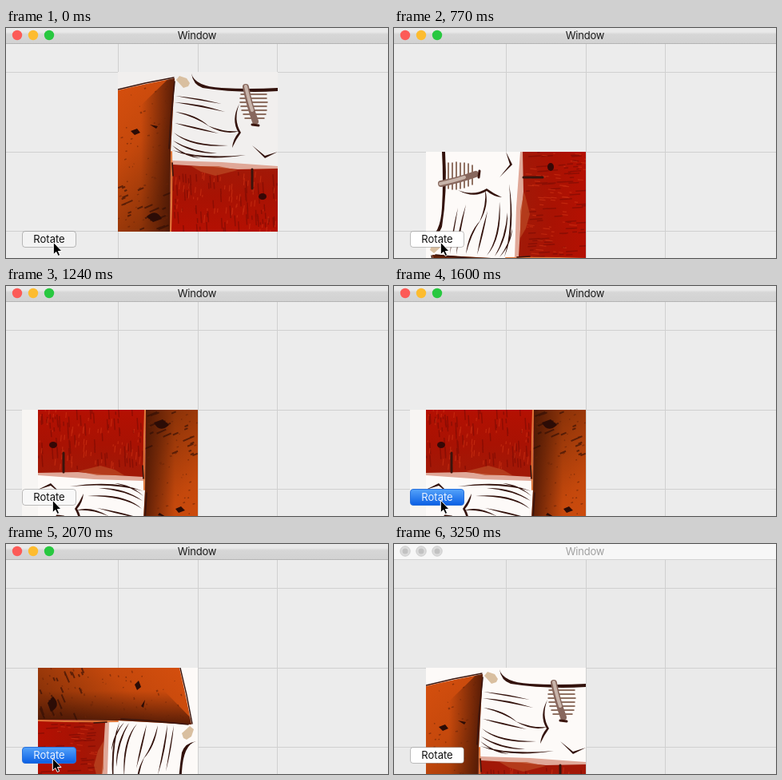
An HTML page that plays this animation: 478 px wide and 288 px high, repeating every 3.35 s.

```html
<!DOCTYPE html>
<html lang="en">
<head>
<meta charset="utf-8">
<title>Window</title>
<style>
html, body { margin: 0; width: 100%; height: 100%; overflow: hidden; background: #ececec }
svg { display: block }
text { font: 13px Inter, "Liberation Sans", sans-serif; text-anchor: middle }
.line { fill: none; stroke: #3a140c; stroke-linecap: round; stroke-linejoin: round }
</style>
</head>
<body>
<svg width="478" height="288" viewBox="0 0 478 288">
  <defs>
    <linearGradient id="bar" x2="0" y2="1">
      <stop offset=".25" stop-color="#e9e9e9"/><stop offset=".4" stop-color="#d6d6d6"/><stop offset="1" stop-color="#d2d2d2"/>
    </linearGradient>
    <linearGradient id="blue" x2="0" y2="1">
      <stop stop-color="#55a3fa"/><stop offset="1" stop-color="#0a5fe4"/>
    </linearGradient>
    <linearGradient id="orange" x2=".4" y2="1">
      <stop stop-color="#d8500e"/><stop offset=".5" stop-color="#c4480c"/><stop offset="1" stop-color="#8a3208"/>
    </linearGradient>
    <linearGradient id="shade">
      <stop offset=".4" stop-color="#300c04" stop-opacity="0"/><stop offset="1" stop-color="#300c04" stop-opacity=".75"/>
    </linearGradient>
    <linearGradient id="red" x2="0" y2="1">
      <stop stop-color="#a01a08"/><stop offset=".5" stop-color="#a81203"/><stop offset="1" stop-color="#b41002"/>
    </linearGradient>
    <clipPath id="frame"><path d="M0 0H200V200H0Z"/></clipPath>
    <clipPath id="wood"><path d="M0 23Q38 14 71 8L66 100 65 200H0Z"/></clipPath>
  </defs>

  <rect id="back" width="478" height="288"/>
  <path d="M140.5 20V288M240.5 20V288M339.5 20V288M0 55.5H478M0 155.5H478M0 254.5H478" stroke="#d0d0d0"/>
  <path id="strip" d="M20 155H40V288H20Z" fill="#f7f5f3"/>

  <g id="photo" clip-path="url(#frame)">
    <path id="paper" d="M0 0H200V200H0Z"/>
    <g clip-path="url(#wood)">
      <path d="M0 0H72V200H0Z" fill="url(#orange)"/>
      <path d="M0 70L72 0V200H0Z" fill="url(#shade)"/>
      <g id="specks"/>
      <path d="M36 181Q48 170 55 184L44 188ZM16 74L24 71 28 76 21 79ZM40 66L50 68 48 71Z" fill="#2c0c06"/>
    </g>
    <path d="M66 113L140 115 200 120V200H65Z" fill="url(#red)"/>
    <g id="stains"/>
    <path d="M68 111L130 113 200 118V121L150 122 120 119 69 116Z" fill="#e0a898"/>
    <path d="M92 118L126 118 150 123 122 130 104 125Z" fill="#bd4a24" opacity=".7"/>
    <path d="M66 200Q68 150 67 100" class="line" style="stroke:#e0783a" stroke-width="2"/>
    <path d="M69 130L68 114M71 12L66 62 64 96" class="line" stroke-width="1.6"/>
    <path d="M0 22L34 14 70 7" class="line" stroke-width="1.4"/>
    <path d="M73 10L77 5 86 8 90 14 88 18 82 20Z" fill="#d9bfa0"/>
    <!-- Tapered cracks in the white paint. -->
    <path fill="#33120c" d="M92 2Q96 18 130 20T200 20V24Q150 27 106 20Q94 16 92 2
      M72 30Q98 32 130 40Q98 35 72 30M71 38Q100 39 134 50Q100 43 71 38M72 50Q98 53 114 68Q98 57 72 50
      M112 67Q134 76 152 74Q134 80 112 67M71 64Q96 68 126 77Q96 72 71 64M70 76Q92 92 138 92Q92 96 70 76
      M69 86Q92 99 124 102Q92 103 69 86M68 98Q104 109 160 104Q104 113 68 98M68 92Q84 104 104 108Q84 107 68 92
      M152 40Q144 60 154 76Q148 84 143 95Q144 84 151 76Q141 60 152 40M168 92L184 105 200 100 184 108Z"/>
    <path d="M154 28H186M153 33H186M153 38H187M154 43H186M155 48H186M157 53H185M159 58H183" class="line" style="stroke:#6e4432" stroke-width="1.5"/>
    <path d="M160 19Q165 43 172 62" class="line" style="stroke:#87675d" stroke-width="8"/>
    <path d="M160 18Q164 36 168 48" class="line" style="stroke:#c8b4aa" stroke-width="4"/>
    <path d="M168 66L176 67M168 122V146" class="line" stroke-width="3"/>
    <ellipse cx="181" cy="156" rx="5" ry="4" fill="#350806"/>
  </g>

  <g id="button">
    <rect x="20.5" y="254.5" width="67" height="20" rx="3.5"/>
    <text x="54" y="269">Rotate</text>
  </g>
  <path id="cursor" d="M0 0V15.5L3.5 12.2 5.9 17.2 8.4 16.1 6.1 11.2H10.7Z" stroke="#fff"/>

  <rect id="title" width="478" height="20"/>
  <path id="edge" d="M0 19.5H478"/>
  <g id="lights">
    <circle cx="14" cy="9" r="6.2"/><circle cx="34" cy="9" r="6.2"/><circle cx="54" cy="9" r="6.2"/>
  </g>
  <path id="dots" d="M14 9h0M34 9h0M54 9h0" stroke="#c2c2c2" stroke-width="7" stroke-linecap="round"/>
  <text id="name" x="239" y="14" letter-spacing="-.2">Window</text>
</svg>
<script>
const LOOP = 3350, HOLD = 120;
const presses = [650, 1120, 1600, 2070];
const colors = ['#fc5b57', '#fdbc2f', '#28c840'];
const $ = id => document.getElementById(id);
const set = (el, attrs) => {
  for (const key in attrs) el.setAttribute(key, attrs[key]);
};
const [face, label] = $('button').children;

let seed = 7;
const random = (min, max) => {
  seed = seed * 16807 % 2147483647;
  return min + (max - min) * seed / 2147483647;
};

// Scatters short strokes of one colour over an area.
function scatter(group, count, [x0, x1, y0, y1], [dx, dy], stroke, width) {
  let d = '';
  for (let i = 0; i < count; i++) {
    const size = random(.2, 1);
    d += `M${random(x0, x1)} ${random(y0, y1)}l${dx * size} ${dy * size}`;
  }
  const path = document.createElementNS('http://www.w3.org/2000/svg', 'path');
  set(path, { d, stroke, 'stroke-width': width, fill: 'none', opacity: .6 });
  group.append(path);
}
scatter($('specks'), 70, [0, 66, 15, 200], [3, -1], '#6a2408', 1.5);
scatter($('specks'), 22, [0, 60, 145, 198], [14, -6], '#2c0c06', 2);
const panel = [68, 200, 124, 198];
scatter($('stains'), 70, panel, [1, 16], '#780a04', 1.5);
scatter($('stains'), 60, panel, [-1, 10], '#d03414', 1.2);

function draw(now) {
  const t = now % LOOP;
  const turns = presses.filter(p => t >= p + HOLD).length;
  const down = presses.some(p => t >= p && t < p + HOLD);
  const active = t < 3250;

  // The first turn also shifts the view's origin.
  const place = turns ? 'translate(40 155)' : 'translate(140 55)';
  set($('photo'), { transform: `${place} rotate(${-90 * turns} 100 100)` });
  set($('paper'), { fill: turns ? '#fdfaf8' : '#f1efee' });
  set($('strip'), { visibility: turns === 2 ? 'visible' : 'hidden' });

  const idle = turns === 0 ? '#f3f3f3' : turns === 2 ? '#f8f8f8' : '#fff';
  set(face, { fill: down ? 'url(#blue)' : idle, stroke: down ? '#2870dc' : 'rgba(0,0,0,.24)' });
  set(label, { fill: down ? '#e8f1ff' : '#101010' });

  const spot = t < 230 ? '59.3 268.3' : t < 2490 ? '58.3 268.3' : '66.3 274.3';
  set($('cursor'), { transform: `translate(${spot})`, visibility: t < 2540 ? 'visible' : 'hidden' });

  set($('back'), { fill: active ? '#ececec' : '#eaeaea' });
  set($('title'), { fill: active ? 'url(#bar)' : '#f7f7f7' });
  set($('edge'), { stroke: active ? '#b4b4b4' : '#d3d3d3' });
  set($('name'), { fill: active ? '#1c1c1c' : '#a0a0a0' });
  set($('dots'), { visibility: active ? 'hidden' : 'visible' });
  [...$('lights').children].forEach((light, i) => set(light, {
    fill: active ? colors[i] : '#dcdcdc',
    stroke: active ? 'none' : '#cccccc'
  }));
}

const start = performance.now();
function tick() {
  draw(performance.now() - start);
  requestAnimationFrame(tick);
}
tick();
</script>
</body>
</html>
```
